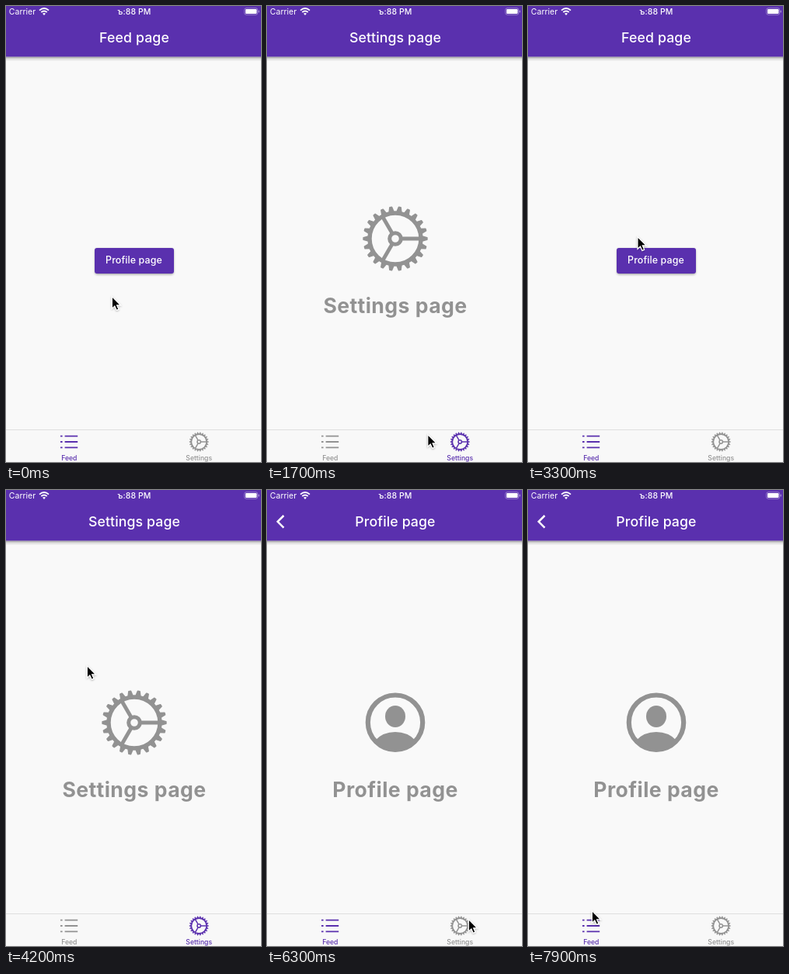
Animation of 328 by 588 pixels, one loop 8 s. Source, as an HTML page:

```html
<!DOCTYPE html>
<html lang="en">
<head>
<meta charset="utf-8">
<title>Tab navigation demo</title>
<style>
  html, body { margin: 0; width: 100%; height: 100%; overflow: hidden; background: #f9f9f9; }
  svg { display: block; width: 328px; height: 588px; font-family: Inter, Roboto, sans-serif; }
  text { text-anchor: middle; }
  .title { font-size: 17.7px; font-weight: 500; fill: #fff; letter-spacing: .12px; }
  .heading { font-size: 26.6px; font-weight: 700; fill: #929292; letter-spacing: .45px; }
  .label { font-size: 8.6px; font-weight: 500; fill: currentColor; }
  .status { font-size: 10.5px; fill: #fff; }
</style>
</head>
<body>
<svg viewBox="0 0 328 588">
  <defs>
    <linearGradient id="fade" x1="0" y1="0" x2="0" y2="1">
      <stop offset="0" stop-opacity=".42"/>
      <stop offset=".4" stop-opacity=".13"/>
      <stop offset="1" stop-opacity="0"/>
    </linearGradient>
    <linearGradient id="edge">
      <stop offset="0" stop-opacity="0"/>
      <stop offset="1" stop-opacity=".14"/>
    </linearGradient>
    <filter id="blur" x="-20%" y="-40%" width="140%" height="200%">
      <feGaussianBlur stdDeviation="1.4"/>
    </filter>
    <filter id="cursorShadow" x="-50%" y="-50%" width="200%" height="200%">
      <feDropShadow dx="0" dy=".8" stdDeviation=".8" flood-opacity=".35"/>
    </filter>
    <clipPath id="buttonClip"><rect x="114" y="312" width="102" height="33" rx="3"/></clipPath>
    <g id="bar">
      <rect width="328" height="588" fill="#f9f9f9"/>
      <rect y="65.4" width="328" height="6" fill="url(#fade)"/>
      <rect width="328" height="65.4" fill="#5a30ae"/>
    </g>
    <g id="gear" fill="none" stroke="currentColor">
      <path id="teeth" fill="currentColor" stroke-width="1.8" stroke-linejoin="round"/>
      <circle r="33" stroke-width="5.4"/>
      <circle r="7.3" stroke-width="5"/>
      <path id="spokes" stroke-width="4.8"/>
    </g>
  </defs>

  <g id="feed">
    <use href="#bar"/>
    <text class="title" x="165" y="47">Feed page</text>
    <rect id="buttonShadow" x="114.5" y="314" width="101" height="33" rx="3" filter="url(#blur)"/>
    <rect x="114" y="312" width="102" height="33" rx="3" fill="#5a30ae"/>
    <g clip-path="url(#buttonClip)" fill="#fff">
      <rect id="highlight" x="114" y="312" width="102" height="33"/>
      <circle id="ripple" cx="158.5"/>
    </g>
    <text x="164.5" y="332.3" fill="#fff" font-size="12.4" font-weight="500" letter-spacing=".12">Profile page</text>
  </g>

  <g id="profile">
    <rect x="-14" width="14" height="588" fill="url(#edge)"/>
    <use href="#bar"/>
    <path d="M21.5 33 13.7 40.8 21.5 48.6" fill="none" stroke="#fff" stroke-width="2.5"/>
    <text class="title" x="165" y="47">Profile page</text>
    <g fill="#929292">
      <circle cx="165" cy="299.7" r="35.2" fill="none" stroke="#929292" stroke-width="6.2"/>
      <ellipse cx="165" cy="292" rx="13" ry="14"/>
      <path d="M139 323Q149 312 165 312T191 323Q181 335.5 165 335.5T139 323Z"/>
    </g>
    <text class="heading" x="165" y="396">Profile page</text>
  </g>

  <g id="settings">
    <use href="#bar"/>
    <text class="title" x="165" y="47">Settings page</text>
    <use href="#gear" transform="translate(165 300)" color="#929292"/>
    <text class="heading" x="165" y="396">Settings page</text>
  </g>

  <g fill="#fff">
    <text class="status" x="21" y="11">Carrier</text>
    <g fill="none" stroke="#fff" stroke-width="1.9">
      <path d="M43 5.6Q49 .4 55 5.6"/>
      <path d="M45.3 8.1Q49 5 52.7 8.1"/>
    </g>
    <path d="M47 9.8Q49 8.2 51 9.8L49 12Z"/>
    <text class="status" x="165" y="11" font-weight="500" letter-spacing=".1">ъ:88 PM</text>
    <rect x="306.7" y="2.7" width="17" height="8.6" rx="2.4" fill="none" stroke="#fff" stroke-width=".8" opacity=".45"/>
    <rect x="308" y="4" width="14.5" height="6" rx="1.2"/>
    <rect x="324.6" y="5.5" width="1.2" height="3" rx=".6" opacity=".5"/>
  </g>

  <rect y="546" width="328" height="42" fill="#f8f8f8"/>
  <path d="M0 546.5H328" stroke="#dedede"/>
  <g id="feedTab">
    <path d="M70 554.6h2.6m3 0H92.2M70 562h2.6m3 0H92.2M70 569.4h2.6m3 0H92.2" stroke="currentColor" stroke-width="1.8"/>
    <text class="label" x="81.3" y="585.7">Feed</text>
  </g>
  <g id="settingsTab">
    <use href="#gear" transform="translate(248.2 562) scale(.3)"/>
    <text class="label" x="248.2" y="585.7">Settings</text>
  </g>

  <g id="cursor" filter="url(#cursorShadow)">
    <path d="M.3-.4V15.2L3.8 11.9 6.2 17.3 8.9 16.1 6.6 10.9H11.4Z" stroke="#fff" stroke-width="1.2"/>
  </g>
</svg>
<script>
  const LOOP = 8000, SLIDE = 400;
  const ACTIVE = '#5a30ae', INACTIVE = '#929292';
  const $ = id => document.getElementById(id);

  // Cursor stops: time, x, y
  const stops = [
    [0, 136, 375], [200, 159, 318], [850, 159, 318], [1300, 250, 553],
    [1550, 250, 553], [2000, 84, 553], [2250, 84, 553], [2650, 30, 40],
    [3050, 30, 40], [3550, 250, 553], [3800, 250, 553], [4200, 104, 227],
    [4300, 104, 227], [4700, 84, 553], [5000, 84, 553], [5500, 158, 342],
    [5850, 158, 342], [6300, 259, 554], [6600, 259, 554], [7200, 82, 543],
    [LOOP, 82, 543]
  ];
  const settingsSpans = [[1400, 2100], [3680, 4800], [6450, 7450]];
  const presses = [[200, 318], [5600, 345]];
  const pushes = [300, 5750];
  const popTime = 2850;

  const clamp = p => Math.max(0, Math.min(1, p));
  const easeOut = p => 1 - (1 - p) ** 3;
  const smooth = p => p * p * (3 - 2 * p);
  const polar = (r, a) => `${(r * Math.cos(a)).toFixed(2)} ${(r * Math.sin(a)).toFixed(2)}`;

  function buildGear(count) {
    let teeth = '';
    for (let i = 0; i < count; i++) {
      const a = i / count * 2 * Math.PI;
      teeth += `M${polar(34, a - .09)}L${polar(40.8, a - .03)}L${polar(40.8, a + .03)}L${polar(34, a + .09)}Z`;
    }
    $('teeth').setAttribute('d', teeth);
    $('spokes').setAttribute('d', [0, 1, 2].map(i => {
      const a = i * 2 * Math.PI / 3;
      return `M${polar(8, a)}L${polar(32, a)}`;
    }).join(''));
  }

  function cursorAt(t) {
    const i = stops.findIndex(s => s[0] > t);
    const [t0, x0, y0] = stops[i - 1], [t1, x1, y1] = stops[i];
    const p = smooth((t - t0) / (t1 - t0));
    return [x0 + (x1 - x0) * p, y0 + (y1 - y0) * p];
  }

  // 0: feed on top, 1: profile fully in place
  function profileProgress(t) {
    const slide = start => easeOut(clamp((t - start) / SLIDE));
    if (t >= pushes[1]) return slide(pushes[1]);
    return t >= popTime ? 1 - slide(popTime) : slide(pushes[0]);
  }

  function drawPress(t) {
    const [start, y] = presses[t < 4000 ? 0 : 1];
    const age = t - start;
    const on = age >= 0 && age < 450;
    const fade = on ? 1 - clamp((age - 200) / 250) : 0;
    $('ripple').setAttribute('cy', y);
    $('ripple').setAttribute('r', on ? 8 + age * .1 : 0);
    $('ripple').setAttribute('opacity', .17 * fade);
    $('highlight').setAttribute('opacity', .08 * fade * clamp(age / 80));
    $('buttonShadow').setAttribute('opacity', .36 + .12 * fade);
    $('buttonShadow').setAttribute('y', 313.3 + 1.7 * fade);
  }

  function render(t) {
    const inSettings = settingsSpans.some(([from, to]) => t >= from && t < to);
    const p = profileProgress(t);
    $('feed').setAttribute('transform', `translate(${-328 / 3 * p} 0)`);
    $('profile').setAttribute('transform', `translate(${328 * (1 - p)} 0)`);
    $('profile').style.display = p > 0 ? '' : 'none';
    $('settings').style.display = inSettings ? '' : 'none';
    $('feedTab').style.color = inSettings ? INACTIVE : ACTIVE;
    $('settingsTab').style.color = inSettings ? ACTIVE : INACTIVE;
    drawPress(t);
    $('cursor').setAttribute('transform', `translate(${cursorAt(t).join(' ')})`);
  }

  function tick() {
    render(performance.now() % LOOP);
    requestAnimationFrame(tick);
  }

  buildGear(22);
  tick();
</script>
</body>
</html>
```
